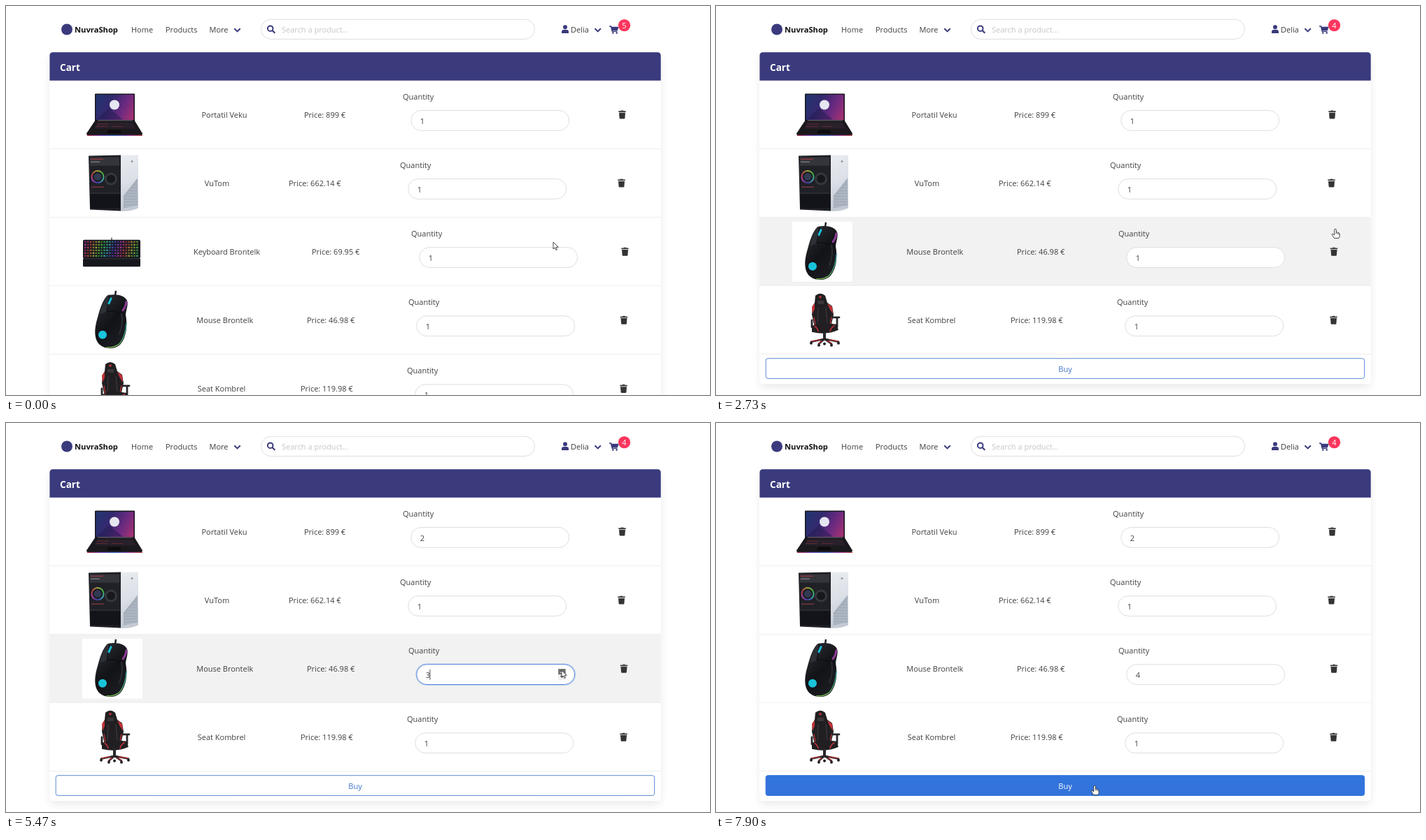
An HTML page with a canvas for the animation above (8 s loop, 1006 by 557 pixels).

```html
<!DOCTYPE html>
<html lang="en">
<head>
<meta charset="utf-8">
<title>Cart</title>
<style>
html, body { margin: 0; width: 100%; height: 100%; overflow: hidden; background: #fff; }
canvas { display: block; }
</style>
</head>
<body>
<canvas id="stage" width="1006" height="557"></canvas>
<script>
const ctx = document.getElementById("stage").getContext("2d");
const LOOP = 8000, ROW_TOP = 106.5, ROW_H = 98.1, INPUT_W = 226;
const LEFT = 62.4, WIDTH = 873.3, TOP = 66.3;
const NAVY = "#3a3a7d", INK = "#404040", BLUE = "#3273dc", HOVER = "#f2f2f2";
const REMOVED = 2300, PRESSED_BUY = 7400, LAST_BLUR = 7900;

const items = [
  { name: "Portatil Veku", nx: 312, price: "899", px: 426, qx: 567, bin: 880.5, ix: 155, art: laptop },
  { name: "VuTom", nx: 301.5, price: "662.14", px: 404, qx: 563, bin: 879.5, ix: 154, art: tower },
  { name: "Keyboard Brontelk", nx: 315.5, price: "69.95", px: 437, qx: 579, bin: 884.5, ix: 151, art: keyboard },
  { name: "Mouse Brontelk", nx: 312.7, price: "46.98", px: 430, qx: 575, bin: 883, ix: 152, art: mouse },
  { name: "Seat Kombrel", nx: 308, price: "119.98", px: 421, qx: 573, bin: 882.5, ix: 155, art: chair }
];

// time, row, quantity
const edits = [[3870, 0, 2], [4770, 2, 2], [5400, 2, 3], [5900, 2, 4]];

// time, x, y of the pointer tip
const track = [
  [0, 782, 338], [400, 782, 338], [760, 526, 332], [1200, 859, 350], [1230, 859, 350],
  [1530, 885.5, 354], [2600, 885.5, 354], [2730, 885, 319], [2900, 892, 245],
  [3110, 815, 140], [3270, 787, 160], [3900, 787, 160], [4280, 832, 250],
  [4670, 797, 359], [4750, 797, 359], [5000, 794, 354], [6430, 794, 354],
  [7030, 541, 526], [7070, 541, 526], [7400, 541, 519], [8000, 541, 519]
];

function pointer(t) {
  let i = 1;
  while (i < track.length - 1 && track[i][0] < t) i++;
  const [t0, x0, y0] = track[i - 1], [t1, x1, y1] = track[i];
  const p = Math.min(1, (t - t0) / (t1 - t0)), e = p * p * (3 - 2 * p);
  const hand = (t >= 1400 && t < 2790) || t >= 6890;
  return { x: x0 + (x1 - x0) * e, y: y0 + (y1 - y0) * e, hand };
}

function rect(c, x, y, w, h) { ctx.fillStyle = c; ctx.fillRect(x, y, w, h); }
function shape(c, d) { ctx.fillStyle = c; ctx.fill(new Path2D(d)); }
function line(c, w, d) {
  ctx.strokeStyle = c;
  ctx.lineWidth = w;
  ctx.stroke(new Path2D(d));
}
function disc(c, x, y, r) {
  ctx.fillStyle = c;
  ctx.beginPath();
  ctx.arc(x, y, r, 0, 7);
  ctx.fill();
}
function box(x, y, w, h, r, fill, stroke, lw = 1) {
  ctx.beginPath();
  ctx.roundRect(x, y, w, h, r);
  if (fill) { ctx.fillStyle = fill; ctx.fill(); }
  if (stroke) { ctx.strokeStyle = stroke; ctx.lineWidth = lw; ctx.stroke(); }
}
function text(s, x, y, color = INK, size = 11, weight = 400, align = "left") {
  ctx.font = `${weight} ${size}px "Open Sans", "Noto Sans", sans-serif`;
  ctx.textAlign = align;
  ctx.fillStyle = color;
  ctx.fillText(s, x, y);
}
function at(x, y, draw) {
  ctx.save();
  ctx.translate(x, y);
  draw();
  ctx.restore();
}
function blend(x0, y0, x1, y1, ...colors) {
  const g = ctx.createLinearGradient(x0, y0, x1, y1);
  colors.forEach((c, i) => g.addColorStop(i / (colors.length - 1), c));
  return g;
}

function laptop() {
  box(-28, -30, 57, 40, 1, "#15151d");
  rect(blend(-26, -22, 27, 6, "#23346f", "#34296f", "#6b2a80", "#a83272"), -26.5, -28.5, 54, 36);
  shape("#231b5288", "M-26 7L-8 -9L12 7z");
  disc("#e6e6f2", 0, -14, 7);
  shape("#1b191d", "M-28 9H29L40 27L39 30H-39L-40 27z");
  rect("#8f8a94", -24, 8, 50, 0.8);
  shape("#28202a", "M-24 11H25L30 20H-29z");
  line("#6e2a34", 0.8, "M-25 13.5H-8M-27 17H-10M-4 17H12");
  shape("#0d0d11", "M-9 22H8L10 27H-11z");
  rect(blend(-39, 0, 40, 0, "#b83a52", "#7d4bc0", "#3970c8", "#a14ab0", "#c84a4a"), -39, 29.3, 79, 1.2);
}

function tower() {
  shape("#202127", "M-36 -39L10 -40V40L-34 38z");
  rect("#34343b", -34, -37, 42, 12);
  rect("#8b3a40", -33, -35, 18, 1.5);
  rect("#85868d", -33, -31, 13, 1.2);
  rect("#131419", -34, 15, 43, 21);
  rect("#3a3b43", -34, 14, 43, 1);
  disc("#36373e", -4, -6, 9);
  disc("#17181c", -4, -6, 6);
  for (let i = 0; i < 18; i++) {
    ctx.beginPath();
    ctx.arc(-23, -9, 8.5, i * Math.PI / 9, (i + 1.1) * Math.PI / 9);
    ctx.strokeStyle = `hsl(${i * 20 + 160} 48% 48%)`;
    ctx.lineWidth = 1.8;
    ctx.stroke();
  }
  disc("#303a52", -23, -9, 5);
  rect("#8d3b44", -32, 5, 18, 1.2);
  shape(blend(10, -40, 35, 30, "#e9ecf0", "#dce0e7", "#c3cad4"), "M10 -40H35V36Q24 41 10 40z");
  shape("#a5aebb", "M14 18L34 -7V32L14 36z");
  for (let y = -2; y < 32; y += 4) line("#c2c9d3", 0.6, `M${Math.max(15, 31 - y)} ${y + 3}H34`);
  disc("#8f98a6", 26, -31, 1.5);
}

function keyboard() {
  line("#26272c", 1.2, "M0 -16V-20");
  box(-41, -17, 82, 27, 2, "#1a1b22");
  for (let r = 0; r < 6; r++)
    for (let c = 0; c < 20; c++)
      rect(`hsl(${(300 + c * 27 + r * 9) % 360} 52% ${32 + (c * 7 + r * 5) % 3 * 6}%)`,
        -39 + c * 3.9, -15 + r * 4, 2.5, 2.2);
  box(-41, 9.5, 82, 12, 1.5, "#17181d");
  rect("#30323a", -40, 10, 80, 0.8);
}

function mouse() {
  line("#222329", 2.5, "M4 -35L5 -42");
  shape(blend(-20, -20, 22, 20, "#25272c", "#121317", "#1b1d22"),
    "M-6 -36C-12 -32 -17 -20 -21 -4C-26 12 -27 28 -17 36C-8 43 6 41 12 34C20 24 22 8 19 -8C20 -16 23 -22 21 -28C18 -35 8 -38 -6 -36z");
  shape("#2e3037", "M-6 -35C-12 -29 -16 -18 -18 -8L-8 -12L-4 -24z");
  line("#08090c", 1, "M-4 -35L-8 -12Q2 -15 10 -9");
  ctx.lineCap = "round";
  line("#16bdd4", 3, "M-2 -31L-5 -24");
  line("#8d3b95", 3, "M20 -26Q19 -19 15 -14");
  line("#2b2d33", 2, "M13 -9Q16 5 10 20");
  line(blend(0, 0, -5, 40, "#2a8f9f", "#38a779", "#8acb57"), 1.3, "M20 4C19 18 16 27 10 34Q2 40 -8 39");
  disc("#19c4db", -14, 21, 6);
}

function chair() {
  const black = "#211f22", red = "#c23238";
  ctx.lineCap = "round";
  line("#29272b", 2.8, "M11 -4H21M18 -3V10M-18 0V10");
  shape(black, "M-13 -35Q-6 -41 1 -35L4 -25L11 -20L13 -8L9 10H-14L-18 -8L-17 -20L-14 -25z");
  shape(red, "M-14 -24L-18 -19L-17 -9L-14 -16z");
  shape(red, "M4 -24L11 -19L12 -9L8 -15z");
  line(red, 1.3, "M-15 -4L-13 6M10 -4L8 6");
  rect("#3b3639", -10, -28, 9, 5);
  disc(red, -6, -33, 1.8);
  line("#49474b", 0.8, "M-9 -18L-10 4M2 -18L4 4");
  shape(black, "M-18 8Q0 3 17 6L20 14Q3 22 -18 17z");
  line(red, 1.6, "M-14 9Q-10 11 -9 16M14 8Q9 11 8 16");
  rect("#29282c", -2, 17, 4, 12);
  line("#2a2528", 2.6, "M0 27L-19 31M0 27L20 31M0 27L-8 34M0 27L10 34");
  line(red, 1.3, "M-7 28L-18 30M7 28L19 30M-4 30L-8 33M5 30L10 33");
  for (const [x, y] of [[-19, 33], [20, 33], [-8, 36], [10, 36], [0, 34]]) disc("#202024", x, y, 2);
}

function bin(x, y) {
  at(x, y, () => {
    rect("#343434", -1.8, -6, 3.6, 1.2);
    rect("#343434", -5.2, -5.2, 10.4, 1.7);
    shape("#343434", "M-4.5 -2.7H4.5L3.9 5Q3.8 6 2.8 6H-2.8Q-3.8 6 -3.9 5z");
  });
}

function chevron(x) {
  line(NAVY, 2, `M${x - 4.2} 32.2L${x} 36.4L${x + 4.2} 32.2`);
}

function navbar(count) {
  disc(NAVY, 87, 33.5, 8);
  text("NuvraShop", 98, 37.5, "#111", 11.2, 700);
  text("Home", 179, 38);
  text("Products", 228, 38);
  text("More", 290.5, 38);
  chevron(330.5);
  box(364.5, 19.2, 391, 28.3, 14.2, "#fff", "#dedede");
  ctx.beginPath();
  ctx.arc(377.7, 32.2, 3.8, 0, 7);
  ctx.strokeStyle = NAVY;
  ctx.lineWidth = 2;
  ctx.stroke();
  line(NAVY, 2.2, "M380.5 35L384.3 38.8");
  text("Search a product...", 394, 38, "#c6c6c6");
  disc(NAVY, 799, 30.3, 3);
  shape(NAVY, "M794 39V37Q794 34 797 34H801Q804 34 804 37V39z");
  text("Delia", 807, 37.5);
  chevron(845.7);
  line(NAVY, 1.5, "M862 29H864.5L866.3 36.3H873.5");
  shape(NAVY, "M864.8 29.8H875.5L874 35H866z");
  disc(NAVY, 867.3, 38.5, 1.3);
  disc(NAVY, 872.7, 38.5, 1.3);
  disc("#fb365e", 883.5, 27.6, 8.7);
  text(count, 883.5, 31.8, "#fff", 11, 400, "center");
}

function card(height) {
  ctx.save();
  ctx.shadowColor = "rgba(10,10,10,.1)";
  ctx.shadowBlur = 13;
  ctx.shadowOffsetY = 5.6;
  box(LEFT + 1.4, TOP + 1.4, WIDTH - 2.8, height - 2.8, 4, "#fff");
  ctx.restore();
  box(LEFT - 0.6, TOP - 0.6, WIDTH + 1.2, height + 1.2, 4.5, "#f9f9f9");
  box(LEFT, TOP, WIDTH, height, 4.5, "#fff");
  box(LEFT, TOP, WIDTH, ROW_TOP + 0.3 - TOP, [4.5, 4.5, 0, 0], NAVY);
  text("Cart", 77, 92.5, "#fff", 13.6, 700);
}

function spinner(x, mid, p, inside, pressed) {
  rect("#efefef", x, mid - 8, 10.5, 16);
  const over = inside && p.x >= x && p.x <= x + 10.5;
  const up = over && p.y < mid - 2;
  if (over) rect(up && pressed ? "#707070" : "#c6c6c6", x, up ? mid - 8 : mid, 10.5, 8);
  const cx = x + 5.2, dark = "#484848";
  shape(up && pressed ? "#fff" : dark, `M${cx - 2.7} ${mid - 2}h5.4l-2.7 -3z`);
  shape(dark, `M${cx - 2.7} ${mid + 2}h5.4l-2.7 3z`);
}

function quantity(x, y, value, p, focused, caret, pressed) {
  const inside = p.x > x && p.x < x + INPUT_W && p.y > y && p.y < y + 29;
  if (focused) box(x - 0.8, y - 0.8, INPUT_W + 1.6, 30.4, 15.2, null, "rgba(50,115,220,.25)", 1.4);
  box(x, y, INPUT_W, 28.8, 14.4, "#fff", focused ? "#5587dc" : inside ? "#b0b0b0" : "#dedede");
  if (focused || inside) spinner(x + INPUT_W - 23.5, y + 14.4, p, inside, pressed);
  text(value, x + 13, y + 19.2);
  if (caret) rect("#555", x + 18.7, y + 7, 1, 15);
}

function cursor(p) {
  at(p.x, p.y, () => {
    const d = p.hand
      ? "M-1.3 1Q0 -1 1.3 1V5Q3 4.2 3.4 5.5Q5 5 5.3 6.4Q6.2 6.2 6.2 7.6V10Q6 12 5 13.5H-1.5Q-3 11 -4.8 8.5Q-5 6.8 -3 7.6L-1.3 9z"
      : "M0 0V10L2.3 7.9L3.9 11.4L5.5 10.7L4 7.3H7.2z";
    shape("#fff", d);
    line("#1d1d1d", 0.8, d);
    if (p.hand) line("#1d1d1d", 0.7, "M1.3 5V7.5M3.4 5.5V8M5.3 6.4V8.5");
  });
}

function draw(t) {
  const p = pointer(t);
  const removed = t >= REMOVED;
  const rows = removed ? items.filter((_, i) => i !== 2) : items;
  const values = [1, 1, 1, 1, 1];
  let last = null;
  for (const e of edits) if (t >= e[0]) { values[e[1]] = e[2]; last = e; }
  const focus = last && t < LAST_BLUR ? last[1] : -1;
  const caretOn = last && t < PRESSED_BUY && Math.floor((t - last[0]) / 530) % 2 === 0;
  const hovered = removed ? Math.floor((p.y - ROW_TOP) / ROW_H) : -1;
  const end = ROW_TOP + rows.length * ROW_H;

  rect("#fff", 0, 0, 1006, 557);
  navbar(rows.length);
  card(end + 42 - TOP);

  rows.forEach((item, i) => {
    const y = ROW_TOP + i * ROW_H, mid = y + 49;
    if (i === hovered) rect(HOVER, LEFT, Math.round(y), WIDTH, 98);
    rect("#efefef", LEFT, Math.round(y + ROW_H) - 1, WIDTH, 1);
    if (!removed && i === 2 && t >= 600) rect(HOVER, 579, 317, 238, 58);
    if (i === hovered) rect("#fff", item.ix - 43, mid - 43, 86, 86);
    at(item.ix, mid, item.art);
    text(item.name, item.nx, mid + 4, INK, 11, 400, "center");
    text(`Price: ${item.price} €`, item.px, mid + 4);
    text("Quantity", item.qx, y + 27);
    const focused = i === focus;
    quantity(item.qx + 11.7, y + 43, values[i], p, focused, focused && caretOn,
      focused && t - last[0] < 130);
    bin(item.bin, mid);
  });

  const buying = p.y > end + 5.5 && p.y < end + 35;
  box(71.2, end + 5.8, 855.4, 28.7, 3, buying ? BLUE : "#fff", buying ? BLUE : "#5b8bd2");
  text("Buy", 499, end + 25, buying ? "#fff" : "#3d72c6", 11, 400, "center");
  cursor(p);
}

function tick() {
  draw(performance.now() % LOOP);
  requestAnimationFrame(tick);
}
tick();
</script>
</body>
</html>
```
